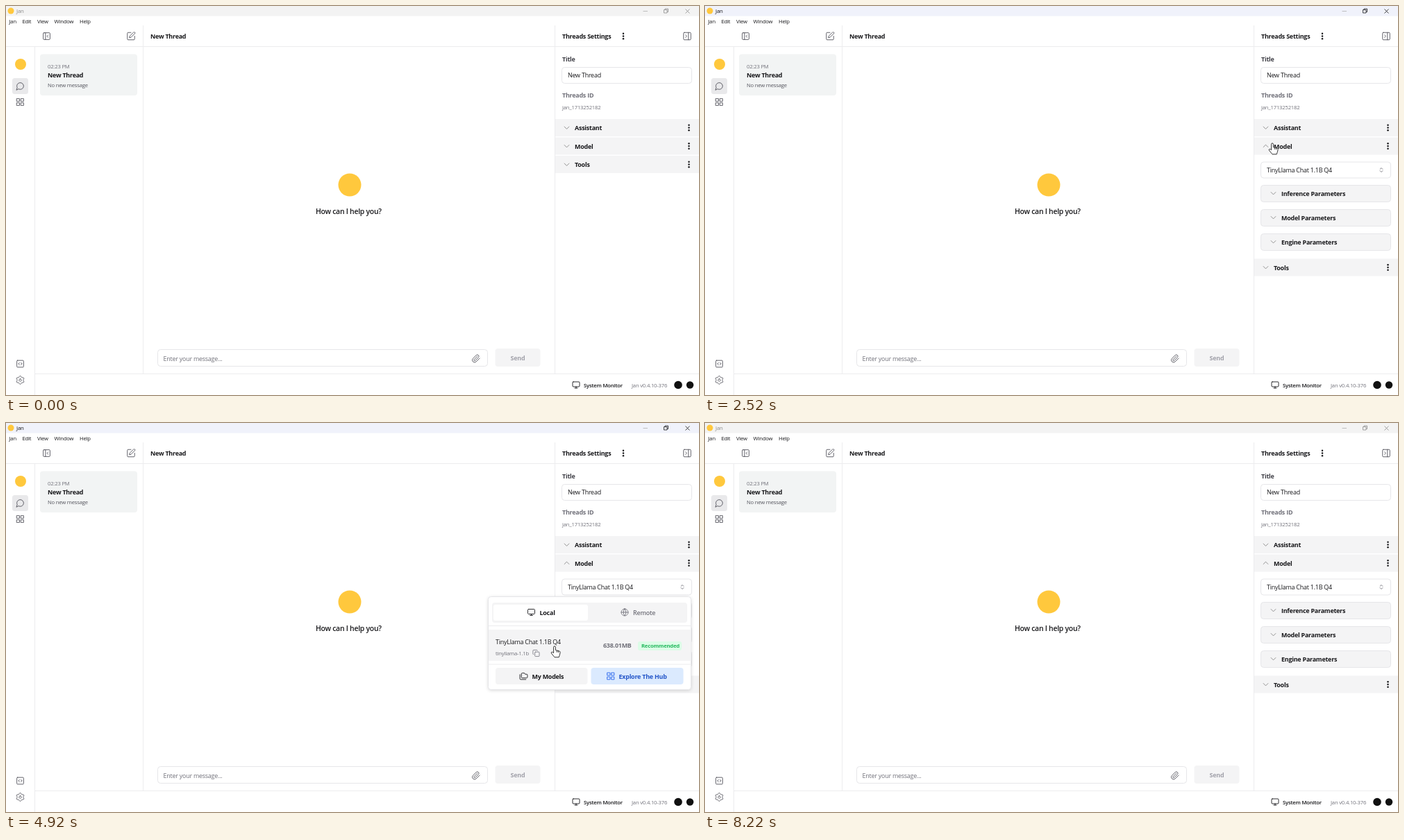
Recreate the animation shown at these times as an HTML page. Size 998 by 561 pixels, loop 8250 ms.

```html
<!DOCTYPE html>
<html lang="en">
<head>
<meta charset="utf-8">
<title>Chat app</title>
<style>
html, body { margin: 0; width: 100%; height: 100%; overflow: hidden; background: #fff; }
svg { display: block; }
text { font-family: "Open Sans", "Noto Sans", sans-serif; letter-spacing: -.026em; white-space: pre; }
#popup { filter: drop-shadow(0 1px 2px rgba(0,0,0,.14)); }
</style>
</head>
<body>
<svg id="stage" width="998" height="561" viewBox="0 0 998 561"></svg>
<script>
const LOOP = 8250, INK = '#18181b', GREY = '#71717a', LINE = '#e6e6e9', SOFT = '#f4f4f5', MARK = '#ffc83d';

// y is the middle of the capital letters
const text = (x, y, s, size = 9.33, weight = 400, fill = INK, extra = '') =>
  `<text x="${x}" y="${y + size * .34}" font-size="${size * .96}" font-weight="${weight}" fill="${fill}" ${extra}>${s}</text>`;
const box = (x, y, w, h, fill = '#fff', r = 0, stroke = 'none') =>
  `<rect x="${x}" y="${y}" width="${w}" height="${h}" rx="${r}" fill="${fill}" stroke="${stroke}"/>`;
const line = (x1, y1, x2, y2) => `<path d="M${x1} ${y1}L${x2} ${y2}" stroke="#ececee"/>`;
const dot = (x, y, r, fill) => `<circle cx="${x}" cy="${y}" r="${r}" fill="${fill}"/>`;
const group = (id, body, extra = '') => `<g id="${id}" ${extra}>${body}</g>`;
const kebab = (x, y) => [-3.8, 0, 3.8].map(d => dot(x, y + d, 1.25, INK)).join('');

const gear = 'M' + Array.from({ length: 48 }, (_, i) => {
  const a = i * Math.PI / 24, r = 8.8 + 1.4 * Math.cos(6 * a);
  return (12 + r * Math.sin(a)).toFixed(2) + ' ' + (12 - r * Math.cos(a)).toFixed(2);
}).join('L') + 'ZM12 9a3 3 0 1 0 .1 0Z';
const frame = 'M5 3H19a2 2 0 0 1 2 2V19a2 2 0 0 1-2 2H5a2 2 0 0 1-2-2V5a2 2 0 0 1 2-2Z';
const shapes = {
  gear,
  panelLeft: frame + 'M9 3V21M16 15l-3-3 3-3',
  panelRight: frame + 'M15 3V21M8 9l3 3-3 3',
  code: frame + 'M10 9l-3 3 3 3M14 9l3 3-3 3',
  edit: 'M12 3H5a2 2 0 0 0-2 2v14a2 2 0 0 0 2 2h14a2 2 0 0 0 2-2v-7M18.4 2.6a2.1 2.1 0 0 1 3 3L12 15l-4 1 1-4Z',
  chat: 'M7.9 20A9 9 0 1 0 4 16.1L2 22Z',
  grid: 'M3 3h7v7H3ZM14 3h7v7H14ZM14 14h7v7H14ZM3 14h7v7H3Z',
  clip: 'M21.4 11l-9.2 9.2a6 6 0 0 1-8.5-8.5l8.6-8.5A4 4 0 1 1 18 8.8l-8.6 8.6a2 2 0 0 1-2.8-2.8l8.5-8.5',
  monitor: 'M4 3H20a2 2 0 0 1 2 2V15a2 2 0 0 1-2 2H4a2 2 0 0 1-2-2V5a2 2 0 0 1 2-2ZM8 21H16M12 17V21',
  globe: 'M12 2a10 10 0 1 0 .1 0ZM12 2a15 15 0 0 0 0 20a15 15 0 0 0 0-20M2 12H22',
  folders: 'M20 17a2 2 0 0 0 2-2V9a2 2 0 0 0-2-2h-4l-2-3H8a2 2 0 0 0-2 2v9a2 2 0 0 0 2 2ZM2 8v11a2 2 0 0 0 2 2h14',
  copy: 'M10 8H20a2 2 0 0 1 2 2V20a2 2 0 0 1-2 2H10a2 2 0 0 1-2-2V10a2 2 0 0 1 2-2ZM4 16a2 2 0 0 1-2-2V4a2 2 0 0 1 2-2H14a2 2 0 0 1 2 2',
  down: 'M3 8l9 9 9-9',
  up: 'M3 16l9-9 9 9',
  sort: 'M7 15l5 5 5-5M7 9l5-5 5 5'
};
const icon = (name, x, y, size = 13, color = '#52525b', weight = .9) =>
  `<path d="${shapes[name]}" transform="translate(${x - size / 2} ${y - size / 2}) scale(${size / 24})" ` +
  `fill="none" stroke="${color}" stroke-width="${weight * 24 / size}" stroke-linecap="round" stroke-linejoin="round"/>`;

const field = (y, label) => box(800.5, y - 11.5, 187, 23, '#fff', 4, LINE) + text(809, y, label);
const section = (y, label, arrow) => box(791, y - 12.5, 207, 25, SOFT) +
  (arrow ? icon(arrow, 807.5, y, 9, '#888') : '') + text(819, y + .5, label, 9.33, 700) + kebab(983.5, y);
const card = (y, label) => box(800.5, y - 12, 187, 24, SOFT, 4, LINE) +
  icon('down', 818.5, y - .5, 9, '#888') + text(830, y + .5, label, 9.33, 700);
const model = (y, name, id) => text(705, y, name) +
  text(705, y + 16.5, id, 8, 400, GREY, 'class="id"') + icon('copy', 0, y + 16.5, 11, GREY, .8);
const tab = (x, name, label, on) => icon(name, x, 273, 12, on ? INK : GREY) +
  text(x + 12, 273.5, label, 9.33, on ? 700 : 600, on ? INK : GREY);
const tabs = remote => box(700, 259, 281, 29, SOFT, 4) + box(remote ? 843 : 702, 262, 136, 23, '#fff', 3) +
  tab(756.5, 'monitor', 'Local', !remote) + tab(891, 'globe', 'Remote', remote) + line(695, 292.5, 987, 292.5);

const remoteModels = [
  ['Vunq Fenolix 8x7b Instruct', 'fenolix-8x7b-32768'],
  ['Tirelva Small', 'tirelva-small-latest'],
  ['Tirelva Medium', 'tirelva-medium-latest'],
  ['Tirelva Large', 'tirelva-large-latest'],
  ['Vunq Tavlo 2 70b', 'tavlo-2-70b']
];

const stage = document.getElementById('stage');
stage.innerHTML = [
  '<clipPath id="list"><path d="M694 250H987V498H694Z"/></clipPath>',
  box(0, 0, 998, 561),
  '<rect id="bar" width="998" height="14.5"/>',
  dot(7, 7, 4.5, MARK),
  group('barInk', text(15, 7.5, 'Jan', 8.2, 400, 'currentColor') +
    '<path d="M947.5 5.5h4.5v4.5h-4.5ZM949 5.5V4h4.5v4.5H952M978.5 4.5l6 6M984.5 4.5l-6 6" fill="none" stroke="currentColor" stroke-width=".8"/>'),
  '<path d="M917.5 7.5h6.5" stroke="#b0b0b0" stroke-width=".8"/>',
  [[4.5, 'Jan'], [23.5, 'Edit'], [45, 'View'], [69.5, 'Window'], [106, 'Help']].map(([x, s]) => text(x, 22, s, 8)).join(''),

  line(0, 58.5, 998, 58.5), line(41.5, 59, 41.5, 561), line(197.5, 28, 197.5, 530),
  line(790.5, 28, 790.5, 530), line(41, 530.5, 998, 530.5),
  icon('panelLeft', 58.5, 43.5), icon('edit', 180, 43.5, 14), icon('panelRight', 981, 43.5, 14),
  text(208, 44, 'New Thread', 9.33, 700), text(801, 44, 'Threads Settings', 9.33, 700), kebab(889, 43.5),

  dot(21, 84, 8, MARK), box(9, 104, 23, 23, '#e9e9eb', 3.5),
  icon('chat', 20.5, 115.5), icon('grid', 20.5, 138.5), icon('code', 20.5, 516), icon('gear', 20.5, 539.5, 14),
  box(49, 69.5, 140, 59.5, '#f2f4f4', 4),
  text(60, 87, '02:23 PM', 8, 400, GREY), text(60, 100, 'New Thread', 9.33, 700), text(60, 114, 'No new message', 8, 400, '#52525b'),

  dot(495, 258, 16.5, MARK), text(446, 296.5, 'How can I help you?', 10.9, 600),
  box(218.5, 495.5, 475, 24, '#fff', 4, LINE), text(226.5, 508.5, 'Enter your message...', 9.33, 400, GREY),
  icon('clip', 677, 508.5), box(704.5, 494, 65, 26, SOFT, 4), text(726.5, 508, 'Send', 9.33, 700, '#a1a1aa'),
  icon('monitor', 821, 546.5, 12, INK), text(832, 547, 'System Monitor', 8, 600),
  text(901, 547, 'Jan v0.4.10-376', 8, 400, GREY), dot(968, 546.5, 5.8, '#111'), dot(985, 546.5, 5.2, '#111'),

  text(801, 77, 'Title', 9.33, 700, '#3f3f46'), field(100, 'New Thread'),
  text(801, 129, 'Threads ID', 9.33, 700, GREY), text(801, 146, 'jan_1713252182', 8, 400, GREY),
  section(175.5, 'Assistant', 'down'), section(202, 'Model'),
  group('closed', icon('down', 807.5, 202, 9, '#888') + section(228.5, 'Tools', 'down')),
  group('open', icon('up', 807.5, 202, 9, '#888') +
    field(236.5, 'TinyLlama Chat 1.1B Q4') + icon('sort', 974, 236.5, 9, GREY) +
    card(270.5, 'Inference Parameters') + card(305.5, 'Model Parameters') + card(340.5, 'Engine Parameters') +
    section(377, 'Tools', 'down')),

  group('popup',
    group('local', box(694.5, 250.5, 292, 134, '#fff', 4, LINE) + tabs(false) +
      '<rect id="hover" x="695" y="298" width="291.5" height="45" fill="#f4f4f5"/>' +
      model(315.5, 'TinyLlama Chat 1.1B Q4', 'tinyllama-1.1b') +
      text(860, 321, '638.01MB', 9.33, 700, GREY) + box(910, 315, 63, 13, '#dcfce7', 3) +
      text(915, 321.5, 'Recommended', 8, 700, '#22b85c') + line(695, 348, 987, 348) +
      box(705, 353, 132.5, 24, SOFT, 4) + icon('folders', 745.5, 365, 13, INK) + text(757.5, 365.5, 'My Models', 9.33, 700) +
      box(842.5, 353, 133, 24, '#dbeafe', 4) + icon('grid', 871, 365, 13, '#2563eb') +
      text(882.5, 365.5, 'Explore The Hub', 9.33, 700, '#2456c9')) +
    group('remote', box(694.5, 250.5, 292, 249, '#fff', 4, LINE) + tabs(true) +
      group('', remoteModels.map(([name, id], i) => model(315.7 + i * 44.2, name, id)).join(''), 'clip-path="url(#list)"'))),

  group('cursor',
    '<path id="arrow" d="M0 0V13L3 10.3 5.1 15 7.1 14.1 5 9.5H9Z"/>' +
    '<path id="hand" d="M-1.4 1.3a1.4 1.4 0 0 1 2.8 0V5.6l5 1.1q2 .6 1.7 2.6L7.3 12.6 6.2 15.8H0L-4.6 10.1q-.7-1.7 1-1.9l2.2 1.4ZM3.4 6.2v2.6M5.6 6.7v2.4"/>',
    'fill="#fff" stroke="#222" stroke-width=".9" stroke-linejoin="round"')
].join('');

const $ = id => document.getElementById(id);
const show = (id, on) => $(id).setAttribute('display', on ? 'inline' : 'none');

// copy icons follow the end of their labels
document.querySelectorAll('.id').forEach(label => {
  const copy = label.nextElementSibling;
  copy.setAttribute('transform', `translate(${label.getComputedTextLength() + 715.5}) ` + copy.getAttribute('transform'));
});

const path = [
  [30, 600, 420], [870, 720, 336], [1590, 801.5, 195.5], [2050, 812, 200], [2520, 817, 198],
  [2950, 845, 234], [3080, 846, 235], [3580, 915, 271], [3720, 914, 272], [4080, 831.5, 273],
  [4350, 785, 273], [4500, 784, 274], [4920, 790, 322], [5350, 791, 323], [6060, 810, 289],
  [6720, 690, 355], [7500, 560, 566]
];
function cursorAt(t) {
  const i = path.findIndex(p => p[0] > t);
  if (i < 1) return null;
  const [t0, x0, y0] = path[i - 1], [t1, x1, y1] = path[i];
  const u = (t - t0) / (t1 - t0), e = u * u * (3 - 2 * u);
  return [x0 + (x1 - x0) * e, y0 + (y1 - y0) * e];
}

const within = (t, a, b) => t >= a && t < b;
const mix = (a, b, k) => `rgb(${a.map((v, i) => Math.round(v + (b[i] - v) * k))})`;

function draw(t) {
  const focus = Math.max(0, Math.min(1, (t - 400) / 150, (8200 - t) / 170));
  $('bar').setAttribute('fill', mix([243, 243, 243], [240, 242, 251], focus));
  $('barInk').setAttribute('color', mix([140, 140, 140], [24, 24, 27], focus));

  const open = t >= 2080, remote = within(t, 3650, 4430);
  show('closed', !open);
  show('open', open);
  show('popup', within(t, 3020, 5320));
  show('local', !remote);
  show('remote', remote);

  const at = cursorAt(t), hand = within(t, 1450, 5400);
  show('cursor', at);
  show('hand', hand);
  show('arrow', !hand);
  show('hover', at && within(at[1], 298, 343));
  if (at) $('cursor').setAttribute('transform', `translate(${at})`);
}

const start = performance.now();
(function tick() {
  draw((performance.now() - start) % LOOP);
  requestAnimationFrame(tick);
})();
</script>
</body>
</html>
```
